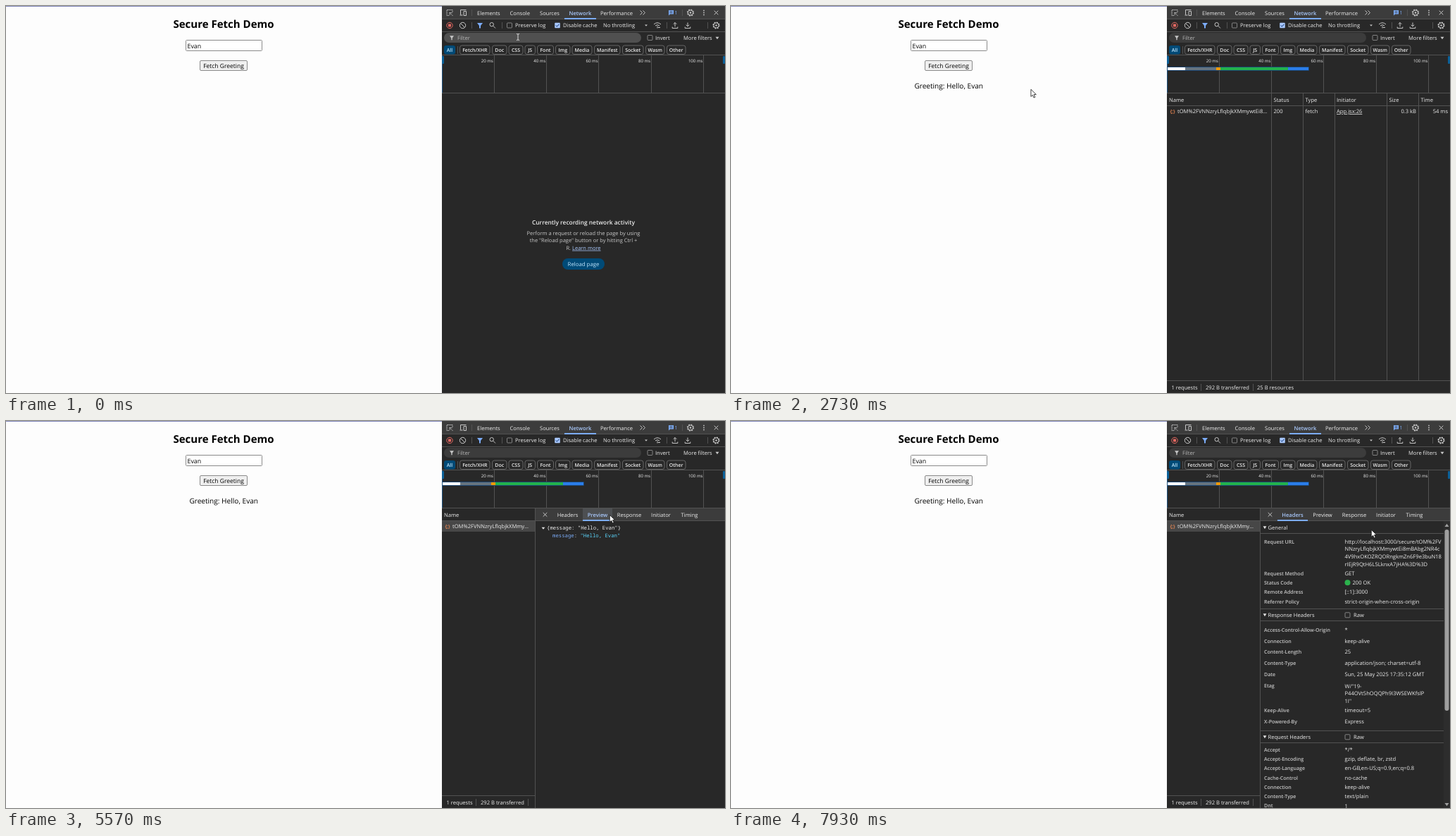
These frames come from a looping animation (1021 by 549 pixels, 8 s). An HTML page:

```html
<!DOCTYPE html>
<html lang="en">
<head>
<meta charset="utf-8">
<title>Secure Fetch Demo</title>
<style>
  html, body { margin: 0; width: 100%; height: 100%; overflow: hidden; background: #fdfdfd; }
  svg { display: block; width: 100vw; height: 100vh; }
  text { font: 7.6px "Open Sans", "Noto Sans", sans-serif; fill: #ececec; text-rendering: geometricPrecision; white-space: pre; }
  .page { fill: #000; }
  .mid { text-anchor: middle; }
  .end { text-anchor: end; }
  .dim { fill: #858585; }
  .key { font-size: 7.05px; font-weight: 600; fill: #c7c7c7; }
  .chip { font-size: 7px; font-weight: 600; text-anchor: middle; }
  .tick { font-size: 6.1px; text-anchor: end; }
  .mono, .mono tspan { font: 7.3px "Noto Sans Mono", "DejaVu Sans Mono", monospace; }
  .prop { fill: #7cacf8; }
  .str { fill: #5cd5fb; }
</style>
</head>
<body>
<svg id="stage" viewBox="0 0 1021 549" preserveAspectRatio="none"></svg>
<script>
const LOOP = 8000, NAME = 'Evan';
const BAR = '#3c3c3c', BODY = '#282828', RULE = '#525252', BLUE = '#7cacf8', ICON = '#c7c7c7';

// Drawing helpers
const text = (x, y, s, attrs = '') => `<text x="${x}" y="${y}" ${attrs}>${s}</text>`;
const rect = (x, y, w, h, fill, attrs = '') =>
  `<rect x="${x}" y="${y}" width="${w}" height="${h}" fill="${fill}" ${attrs}/>`;
const hline = (x1, x2, y, c = RULE) => rect(x1, y, x2 - x1, 1, c);
const vline = (x, y1, y2, c = RULE) => rect(x, y1, 1, y2 - y1, c);
const icon = (x, y, d, c = ICON, attrs = '') =>
  `<path transform="translate(${x} ${y})" d="${d}" fill="none" stroke="${c}" ${attrs}/>`;
const solid = (x, y, d, c = ICON) => `<path transform="translate(${x} ${y})" d="${d}" fill="${c}"/>`;
const group = (id, ...parts) => `<g id="${id}">${parts.join('')}</g>`;
const cls = (name) => `class="${name}"`;
const box = (x, y) => rect(x - 3.5, y - 3.5, 7, 7, 'none', `rx="1" stroke="#9a9a9a" stroke-width=".8"`);
const gear = (x, y) =>
  `<circle cx="${x}" cy="${y}" r="4.4" fill="none" stroke="${ICON}" stroke-width="1.3" stroke-dasharray="1.9 1.55"/>` +
  `<circle cx="${x}" cy="${y}" r="3.6" fill="none" stroke="${ICON}"/><circle cx="${x}" cy="${y}" r="1.2" fill="${ICON}"/>`;
const DOWN = 'M-2.5-1.5h5L0 2z';
const FUNNEL = 'M-4-3.5h8L1 .5V4h-2V.5z';
const CROSS = 'M-2.8-2.8 2.8 2.8M2.8-2.8-2.8 2.8';

const page = [
  rect(0, 0, 619, 549, '#fdfdfd'),
  rect(0, 0, 619, 1, '#8288bb'),
  text(309, 30.5, 'Secure Fetch Demo', 'class="page mid" style="font-size:15px;font-weight:700"'),
  rect(255.5, 48.5, 108, 15, '#fff', 'rx="1" stroke="#8a8a8a"'),
  text(257.5, 59.6, NAME, 'class="page" style="font-size:8.8px"'),
  rect(275.5, 77.5, 67, 14, '#efefef', 'id="button" rx="1.5" stroke="#8a8a8a"'),
  text(309, 88.2, 'Fetch Greeting', 'class="page mid" style="font-size:8.5px"'),
  group('greeting', text(309.2, 117, `Greeting: Hello, ${NAME}`, 'class="page mid" style="font-size:10.1px"')),
].join('');

const mainTabs = [['Elements', 669], ['Console', 715.5], ['Sources', 758], ['Performance', 844]];
const tabStrip = [
  rect(619, 0, 402, 18, BAR),
  hline(619, 1021, 18), hline(619, 1021, 36),
  icon(630, 9.5, 'M4-1V-4H-4V4h3M0 0l4.5 4.5M0 0v3.5M0 0h3.5', ICON, 'stroke-dasharray="1.6 .7"'),
  icon(649, 9.5, 'M-4.5 3.5h4M-3.5 3V-4h8M1-2h3.5v6H1z'),
  vline(661, 5, 14),
  ...mainTabs.map(([s, x]) => text(x, 12.8, s)),
  text(799.5, 12.8, 'Network', 'style="fill:#a8c7fa;font-weight:600"'),
  rect(793, 17, 45, 2, BLUE),
  icon(904, 9.5, 'M-3.5-3-.5 0l-3 3M.5-3l3 3-3 3'),
  solid(944.5, 9.5, 'M-3.5-3.5h7v5.5h-5l-2 2z', BLUE),
  icon(944.5, 9, 'M-2-1.3h4M-2 .6h4', BAR, 'stroke-width=".8"'),
  text(949.5, 12, '1', 'style="fill:#7cacf8;font-size:7px"'),
  vline(960, 5, 14), gear(972, 9.5),
  solid(991, 9.5, 'M-.8-3.8h1.6v1.6h-1.6zM-.8-.8h1.6V.8h-1.6zM-.8 2.2h1.6v1.6h-1.6z'),
  icon(1008.5, 9.5, CROSS),
].join('');

const toolbar = [
  icon(630, 27.5, 'M-4.2 0a4.2 4.2 0 1 0 8.4 0a4.2 4.2 0 1 0-8.4 0', '#e46962'),
  rect(628, 25.5, 4, 4, '#e46962'),
  icon(648.5, 27.5, 'M-4.2 0a4.2 4.2 0 1 0 8.4 0a4.2 4.2 0 1 0-8.4 0M-3-3 3 3'),
  vline(661, 23, 32), solid(673, 27.5, FUNNEL, BLUE),
  icon(690.5, 27, 'M-3.5-.8a2.7 2.7 0 1 0 5.4 0a2.7 2.7 0 1 0-5.4 0M1.2 1.2 4.5 4.5'),
  vline(704, 23, 32), box(715, 27.5), text(723, 30.3, 'Preserve log'),
  rect(779.2, 23.7, 7.6, 7.6, '#a8c7fa', 'rx="1"'), icon(783, 27.5, 'M-2.2 0-.6 1.7 2.4-1.7', '#062e6f'),
  text(791, 30.3, 'Disable cache'), text(848, 30.3, 'No throttling'),
  solid(909, 27.5, 'M-2-1h4L0 1.2z'),
  icon(925, 27.5, 'M-5-1.5Q0-6 5-1.5M-3 .5Q0-2 3 .5M0 1v3M1 3h3'),
  vline(938, 23, 32),
  icon(950, 27.5, 'M-3.8 2v2h7.6V2M0 1.8V-4M-2.3-1.7 0-4l2.3 2.3'),
  icon(968, 27.5, 'M-3.8 2v2h7.6V2M0 1.5V-4M-2.3-.8 0 1.5 2.3-.8'),
  vline(996, 23, 32), gear(1008.5, 27.5),
  rect(622, 38, 280, 14, BAR, 'id="filter" rx="7"'),
  solid(633, 45, 'M-3-2.8h6L.7.5v2.8H-.7V.5z'), text(641, 47.8, 'Filter', 'style="fill:#b5b5b5"'),
  box(914.5, 45), text(922, 47.8, 'Invert'), text(962, 47.8, 'More filters'), solid(1010, 45.3, DOWN),
].join('');

const chipList = [['Fetch/XHR', 644.5, 687], ['Doc', 690.5, 711], ['CSS', 714, 734], ['JS', 737, 751.5],
  ['Font', 754.5, 777.5], ['Img', 780.5, 801], ['Media', 804, 832], ['Manifest', 835.5, 872],
  ['Socket', 875.5, 905], ['Wasm', 908.5, 935], ['Other', 938.5, 965]];
const chips = [
  rect(622, 56, 16, 12.5, '#004a77', 'rx="3"'),
  text(630, 64.8, 'All', 'class="chip" style="fill:#c2e7ff"'),
  vline(641, 57, 68),
  ...chipList.map(([s, a, b]) =>
    rect(a, 56, b - a, 12.5, BODY, 'rx="3" stroke="#757575" stroke-width=".8"') +
    text((a + b) / 2, 64.8, s, cls('chip'))),
].join('');

const timeline = [
  hline(619, 1021, 69),
  ...[1, 2, 3, 4, 5].map(i =>
    vline(Math.floor(618.6 + 74.4 * i), 70, 123) + text(617.5 + 74.4 * i, 79.8, `${20 * i} ms`, cls('tick'))),
  group('bars',
    rect(619, 86, 202, 6, '#1b4470', 'rx="1"'),
    ...[[620, 645, '#fff'], [645, 689, '#66747f'], [689, 695, '#f29900'], [695, 791, '#22b24c'], [791, 820, '#2b7de9']]
      .map(([a, b, c]) => rect(a, 87, b - a, 4, c))),
  rect(619, 70, 1, 54, '#1d4f7c'), rect(619, 71, 3, 11, '#0b6098', 'rx="1"'), rect(1018, 71, 3, 11, '#0b6098', 'rx="1"'),
  hline(619, 1021, 123),
].join('');

const hint = (y, s) => text(820, y, s, 'class="mid" style="font-size:7.5px;fill:#c7c7c7"');
const empty = group('empty',
  text(820, 310.4, 'Currently recording network activity', 'class="mid" style="font-size:8.4px;font-weight:600"'),
  hint(324.5, 'Perform a request or reload the page by using'),
  hint(335, 'the "Reload page" button or by hitting Ctrl +'),
  hint(345.7, 'R. <tspan fill="#a8c7fa" text-decoration="underline">Learn more</tspan>'),
  rect(790, 358, 60, 16, '#004a77', 'rx="8"'),
  text(820, 368.8, 'Reload page', 'class="mid" style="font-size:7.8px;font-weight:500;fill:#c2e7ff"'));

const columns = [['Name', 622], ['Status', 770.5], ['Type', 815.5], ['Initiator', 860], ['Size', 934.5], ['Time', 979.5]];
const table = group('table',
  hline(619, 1021, 141),
  rect(619, 142, 402, 15, BODY, 'id="row"'),
  ...[767, 812, 857, 931, 976].map(x => vline(x, 124, 531)),
  ...columns.map(([s, x]) => text(x, 135.6, s)),
  text(634, 152, '', 'id="file"'), text(815.5, 152, 'fetch'),
  text(860, 152, 'App.jsx:26', 'text-decoration="underline"'),
  hline(619, 1021, 531),
  text(625.5, 543.5, '1 requests'), vline(667, 536, 546),
  group('pending',
    icon(627, 149, 'M-3-3.7h3.7L3-1.4v5.1h-6zM.7-3.7v2.3H3', '#e3e3e3', 'stroke-width=".9"'),
    text(770.5, 152, '(pending)', cls('dim')), text(973, 152, '0.0 kB', cls('end')),
    text(1018, 152, 'Pending', 'class="dim end"'),
    text(674, 543.5, '0 B transferred'), vline(732, 536, 546), text(738.5, 543.5, '0 B resources')),
  group('done',
    text(627, 151.6, '{;}', 'class="mid" style="fill:#f28b54;font-size:7px;font-weight:600"'),
    text(770.5, 152, '200'), text(973, 152, '0.3 kB', cls('end')), text(1018, 152, '54 ms', cls('end')),
    text(674, 543.5, '292 B transferred'), vline(741, 536, 546),
    group('resources', text(747, 543.5, '25 B resources'))));

const tabs = [['Headers', 776, 819], ['Preview', 819, 861], ['Response', 861, 909], ['Initiator', 909, 951], ['Timing', 951, 990]];
const pair = (y, key, ...values) =>
  text(757, y + 2.6, key, cls('key')) + values.map((v, i) => text(871.5, y + 2.7 + 10.6 * i, v)).join('');
const section = (y, s, raw) =>
  solid(758, y, 'M-2.4-1.8h4.8L0 2.2z', '#e3e3e3') + text(762.5, y + 2.8, s, 'style="font-weight:500"') +
  hline(752, 1012, y + 8) + (raw ? hline(752, 1012, y - 9) + box(875.5, y + .3) + text(884, y + 3.4, 'Raw') : '');

const headers = group('headers',
  section(151, 'General'),
  pair(171, 'Request URL', 'http://localhost:3000/secure/tOM%2FV', 'NNzryLflqbjkXMmywtEi8mBAbg2NR4c',
    '4V9hxOKOZRQORngkmZn6F9e3buN18', 'rIEjR9QtH6L5LknxA7jHA%3D%3D'),
  pair(216, 'Request Method', 'GET'),
  pair(229.3, 'Status Code'), '<circle cx="875.5" cy="229.2" r="4" fill="#2bb24c"/>', text(882.5, 232, '200 OK'),
  pair(242.6, 'Remote Address', '[::1]:3000'),
  pair(256, 'Referrer Policy', 'strict-origin-when-cross-origin'),
  section(275, 'Response Headers', true),
  pair(296, 'Access-Control-Allow-Origin', '*'), pair(312, 'Connection', 'keep-alive'),
  pair(327.7, 'Content-Length', '25'), pair(343.6, 'Content-Type', 'application/json; charset=utf-8'),
  pair(359.5, 'Date', 'Sun, 25 May 2025 17:35:12 GMT'),
  pair(375.8, 'Etag', 'W/"19-', 'P44OVt5hOQQPh9I3WSEWKfslP', '1I"'),
  pair(410.3, 'Keep-Alive', 'timeout=5'), pair(426.3, 'X-Powered-By', 'Express'),
  section(448, 'Request Headers', true),
  ...[['Accept', '*/*'], ['Accept-Encoding', 'gzip, deflate, br, zstd'], ['Accept-Language', 'en-GB,en-US;q=0.9,en;q=0.8'],
    ['Cache-Control', 'no-cache'], ['Connection', 'keep-alive'], ['Content-Type', 'text/plain'], ['Dnt', '1']]
    .map(([k, v], i) => pair(466 + 13.3 * i, k, v)),
  rect(1012, 142, 9, 407, '#2d2d2d'), rect(1013.5, 154, 6, 257, '#9f9f9f', 'rx="3"'),
  solid(1016.5, 148, 'M-3 2h6L0-2.2z', '#9f9f9f'), solid(1016.5, 544, 'M-3-2h6L0 2.2z', '#9f9f9f'));

const preview = group('preview',
  solid(763, 152, 'M-2.4-1.2h4.8L0 1.7z', '#e3e3e3'),
  text(768, 154.4, `{message: "Hello, ${NAME}"}`, cls('mono')),
  text(776, 164.9, `<tspan class="prop">message</tspan>: <tspan class="str">"Hello, ${NAME}"</tspan>`, cls('mono')));

const response = group('response',
  text(764, 154.4, '1', 'class="mono dim end"'),
  text(776, 154.4, `{<tspan class="str">"message"</tspan>:<tspan class="str">"Hello, ${NAME}"</tspan>}`, cls('mono')),
  hline(752, 1021, 531),
  text(757, 543.3, '{ }', cls('mono')), text(774, 543.5, 'Line 1, Column 1'));

const details = group('details',
  rect(751, 124, 270, 425, BODY), rect(751, 124, 270, 17, BAR), vline(751, 124, 549),
  icon(765.5, 132.8, CROSS),
  rect(0, 124, 0, 17, '#4d4f52', 'id="tabHover"'),
  hline(752, 1021, 141),
  ...tabs.map(([s, a, b]) => text((a + b) / 2, 136.4, s, cls('mid tab'))),
  rect(0, 140, 0, 2, BLUE, 'id="underline"'),
  headers, preview, response);

const replay = group('replay', rect(-5.5, -5.5, 11, 11, '#a8c7fa', 'rx="2"'),
  icon(0, 0, 'M2.6-1.4A3 3 0 1 0 2.8 1.2M3-3.4v2.2H.8', '#062e6f'));

const pointers = group('pointer',
  group('arrow', '<path d="M.3.3v10.2l2.4-2.2 1.7 3.8 1.8-.8-1.7-3.7h3.2z" fill="#fff" stroke="#111" stroke-width=".8"/>'),
  group('beam', icon(0, 0, 'M-2-4.5Q0-4.5 0-3.5Q0-4.5 2-4.5M0-3.5v7M-2 4.5Q0 4.5 0 3.5Q0 4.5 2 4.5', '#eee', 'stroke-width=".9"')));

document.getElementById('stage').innerHTML = page + rect(619, 0, 402, 549, BODY) + tabStrip + toolbar +
  chips + timeline + empty + table + details + replay + pointers;

// Motion
const el = (id) => document.getElementById(id);
const show = (id, on) => { el(id).style.display = on ? '' : 'none'; };
const set = (id, attrs) => { for (const k in attrs) el(id).setAttribute(k, attrs[k]); };
const progress = (t, a, b) => Math.min(1, Math.max(0, (t - a) / (b - a)));
const smooth = (p) => p * p * (3 - 2 * p);
const easeOut = (p) => 1 - (1 - p) ** 3;
const mix = (a, b, p) => a + (b - a) * p;

const CLICK = { fetch: 1700, reply: 1770, row: 3330, preview: 4930, response: 6030, headers: 7470 };

// start, end, from, bend, to
const moves = [
  [0, 600, [727, 44], [560, 70], [321, 88]],
  [1129, 1130, [321, 88], [322, 88], [322, 89]],
  [2500, 3170, [322, 89], [520, 150], [650, 151]],
  [3770, 4570, [650, 151], [974.5, 154], [857, 133]],
  [5570, 5730, [857, 133], [866, 134], [875, 134]],
  [6470, 7200, [875, 134], [1000, 140], [804, 131]],
  [7470, 7930, [804, 131], [850, 150], [909, 154]],
];
const slides = [
  [0, 1, [776, 819], [776, 819]],
  [CLICK.preview, 5130, [776, 819], [819, 861]],
  [CLICK.response, 6230, [819, 861], [861, 909]],
  [CLICK.headers, 7620, [809, 845], [776, 819]],
];
const latest = (list, t) => list.filter(item => item[0] <= t).pop();

function pointerAt(t) {
  const [a, b, from, bend, to] = latest(moves, t);
  const p = smooth(progress(t, a, b));
  return from.map((v, i) => mix(mix(v, bend[i], p), mix(bend[i], to[i], p), p));
}

function render(t) {
  const [x, y] = pointerAt(t);
  const inside = (x1, y1, x2, y2) => x >= x1 && x < x2 && y >= y1 && y < y2;
  const sent = t >= CLICK.fetch, done = t >= CLICK.reply, open = t >= CLICK.row;
  const view = t >= CLICK.headers ? 'headers' : t >= CLICK.response ? 'response' : t >= CLICK.preview ? 'preview' : 'headers';

  const overFilter = inside(622, 38, 902, 52);
  set('pointer', { transform: `translate(${x} ${y})` });
  show('beam', overFilter);
  show('arrow', !overFilter);
  set('filter', { fill: overFilter ? '#505050' : BAR });
  set('button', { fill: inside(275, 77, 343, 92) ? '#e0e0e0' : '#efefef' });

  show('empty', !sent);
  show('table', sent);
  show('pending', !done);
  for (const id of ['done', 'greeting', 'bars']) show(id, done);
  show('resources', !open);

  const overRow = sent && inside(619, 142, open ? 751 : 1021, 157);
  const rowFill = t >= CLICK.preview ? '#474747' : open ? '#004a77' : overRow ? '#393b3e' : BODY;
  set('row', { fill: rowFill });
  show('replay', overRow);
  set('replay', { transform: `translate(${open ? 743.5 : 759.5} 148.5)` });
  const shown = open ? (overRow ? 'XM' : 'XMmy') : (overRow ? 'XMmywt' : 'XMmywtEi8');
  el('file').textContent = `tOM%2FVNNzryLflqbjk${shown}...`;

  show('details', open);
  for (const id of ['headers', 'preview', 'response']) show(id, view === id);
  const hovered = y >= 124 && y < 142 && tabs.find(([, a, b]) => x >= a && x < b);
  set('tabHover', hovered ? { x: hovered[1], width: hovered[2] - hovered[1] } : { width: 0 });
  document.querySelectorAll('.tab').forEach((tab) => {
    const active = tab.textContent.toLowerCase() === view;
    tab.style.fill = active ? '#a8c7fa' : '';
    tab.style.fontWeight = active ? 600 : 400;
  });

  const [a, b, from, to] = latest(slides, t);
  const [left, right] = from.map((v, i) => mix(v, to[i], easeOut(progress(t, a, b))));
  set('underline', { x: left, width: right - left });
}

const start = performance.now();
function frame() {
  render((performance.now() - start) % LOOP);
  requestAnimationFrame(frame);
}
frame();
</script>
</body>
</html>
```
